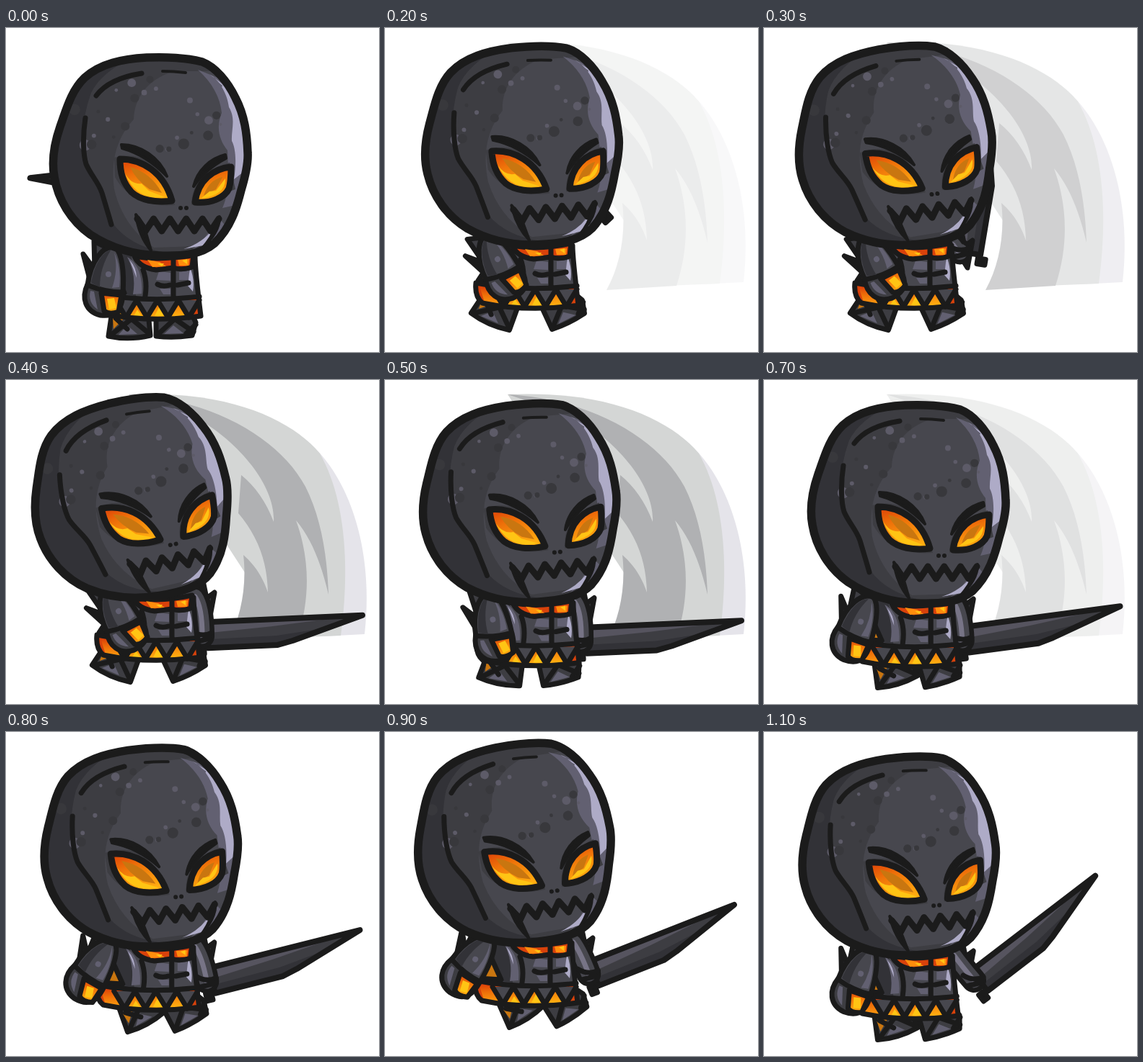
These frames come from a looping animation (517 by 450 pixels, 1200 ms). An HTML page:

```html
<!DOCTYPE html>
<html lang="en">
<head>
<meta charset="utf-8">
<title>Stone warrior slash</title>
<style>
  html, body { margin: 0; width: 100%; height: 100%; overflow: hidden; background: #fff; }
  svg { display: block; width: 517px; height: 450px; }
  .ink { stroke: #1b1b1b; stroke-width: 7; stroke-linejoin: round; stroke-linecap: round; }
  .line { fill: none; }
  .thin { stroke-width: 4; }
  .bold { stroke-width: 9; }
  .dark { fill: #323237; }
  .stone { fill: #3d3d42; }
  .mid { fill: #47474e; }
  .pale { fill: #626071; }
  .shine { fill: #aeabc7; }
  .black { fill: #1b1b1b; }
  .lava { fill: url(#lava); }
  .ember { fill: #d9420b; }
  .amber { fill: #c97610; }
  .gold { fill: #ffc414; }
</style>
</head>
<body>
<svg viewBox="0 0 517 450">
  <defs>
    <linearGradient id="lava" x1="0" y1="0" x2=".25" y2="1">
      <stop offset="0" stop-color="#dc3e08"/>
      <stop offset=".4" stop-color="#ee7009"/>
      <stop offset="1" stop-color="#ffab10"/>
    </linearGradient>
    <path id="skull" d="M272 47C250 41 222 40 195 41C162 43 131 49 109 69C90 87 83 115 75 137C66 163 63 185 67 207C72 238 90 268 117 287C143 304 175 315 212 316C245 317 270 315 289 299C312 277 320 249 326 225C332 205 336 188 335 173C334 147 331 122 318 97C307 74 290 54 272 47Z"/>
    <clipPath id="skullClip"><use href="#skull"/></clipPath>
    <path id="eyeL" d="M158 182C188 182 219 200 230 240C207 243 186 239 174 228C162 215 158 201 158 182Z"/>
    <path id="eyeR" d="M312 193C288 195 266 211 262 242C284 244 303 236 309 223C312 213 312 205 312 193Z"/>
    <clipPath id="eyeClip"><use href="#eyeL"/><use href="#eyeR"/></clipPath>
  </defs>

  <g id="slash">
    <path fill="#e5e4ea" d="M400 72C466 112 512 220 497 353L440 356Z"/>
    <path fill="#d4d6d5" d="M170 20C310 14 395 55 435 102C468 160 478 250 464 355L390 358Z"/>
    <path fill="#b0b1b3" d="M170 20C288 27 380 82 415 148C436 190 445 240 447 298C438 260 425 222 402 195C420 245 423 300 404 358L307 364C326 330 334 285 329 243C345 257 356 274 363 295C362 250 348 216 322 185L326 132C345 147 361 170 371 197C374 152 330 90 260 50Z"/>
  </g>

  <g id="sword">
    <path class="ink black" d="M-17 15H-9V26H-17Z"/>
    <path class="stone" d="M-4 -18H212L114 13L93 18H-4Z"/>
    <path fill="#56545f" d="M0 -16H175L85 -8L0 -3Z"/>
    <path class="dark" d="M0 6L92 5L165 -3L93 18H0Z"/>
    <path class="ink line" style="stroke-width:8" d="M-4 -18H212L114 13L93 18H-4Z"/>
  </g>

  <g id="rightArm">
    <path id="spikes" class="ink stone" d="M268 322L275 294L280 318L291 310L284 348Z"/>
    <path id="armInk" class="line" stroke="#1b1b1b" stroke-width="34" stroke-linecap="round"/>
    <path id="armFill" class="line" stroke="#47474e" stroke-width="21" stroke-linecap="round"/>
    <path id="armLight" class="line" stroke="#777486" stroke-width="7" stroke-linecap="round"/>
    <path id="cuff" class="ink line" d="M-15 -7Q0 2 13 -5M-10 8L10 3"/>
  </g>

  <g id="body">
    <g id="legL">
      <path class="ink stone" d="M147 394H197L200 427Q170 434 142 428Z"/>
      <path class="amber" d="M148 403L164 403L149 418Z"/>
      <path class="pale" d="M168 413L182 425L156 426Z"/>
      <path class="ink line" d="M146 426L174 404L198 424M152 403L168 418"/>
    </g>
    <g id="legR">
      <path class="ink stone" d="M208 394H256L263 409L258 427Q232 431 208 428Z"/>
      <path class="pale" d="M232 413L246 424L219 425Z"/>
      <path class="ink line" d="M210 426L234 404L260 422M250 424L263 412"/>
    </g>
    <path class="mid" d="M150 300H262L270 400Q200 410 137 396Q118 380 150 335Z"/>
    <path class="dark" d="M150 300H172L180 372L146 368Z"/>
    <path class="pale" d="M168 318C183 326 190 347 188 369L176 370Q181 342 168 318ZM212 338L228 340V351L208 350ZM240 339L253 336L257 350H240ZM213 362L228 362V370H218Z"/>
    <path class="shine" d="M255 332Q262 350 259 366L252 358ZM171 322Q181 333 181 347Q176 333 171 322Z"/>
    <path class="ink amber" d="M131 366L150 337L164 368Z"/>
    <path class="ember" d="M128 369Q195 382 268 373L270 400Q200 410 137 397Q126 388 128 369Z"/>
    <path class="lava" d="M133 374L152 378L166 402L140 396ZM182 381L196 403H168ZM212 380L226 403H198ZM242 380L256 402H228Z"/>
    <path class="gold" d="M206 400L212 388L219 400ZM177 400L182 391L188 400Z"/>
    <path id="beltTeeth" class="ink mid"/>
    <path class="ink ember" d="M178 317Q216 324 260 314L258 332Q244 337 232 333L208 336Q185 333 178 317Z"/>
    <path fill="#ff8d0d" d="M196 322L213 325L222 331L203 332ZM238 322L254 321L253 330L240 330Z"/>
    <path class="gold" d="M244 323L251 321V328ZM210 327L219 327L216 331Z"/>
    <path class="ink line" d="M232 318V374M210 356Q218 360 227 357M238 357L253 354M190 336Q196 352 193 372M262 317Q262 335 270 400Q200 410 137 397Q126 388 128 369Q195 382 268 373"/>
    <g id="leftArm">
      <path class="ink stone" d="M118 356L107 314L123 336L122 296L146 308Z"/>
      <path class="ink stone" d="M113 356C104 375 110 394 131 399C148 401 161 396 162 368Z"/>
      <path class="pale" d="M117 365Q113 381 127 391L122 366Z"/>
      <path class="ink lava" d="M132 368L160 371L156 394Q143 399 136 393Z"/>
      <path class="gold" d="M140 376L150 375L153 389L143 391Z"/>
      <path class="ink mid" d="M113 357C117 325 134 301 151 305C161 312 164 340 162 367Q137 367 113 357Z"/>
      <path class="dark" d="M118 354C123 326 135 310 145 309Q130 333 130 360Z"/>
      <path class="pale" d="M150 312Q160 332 157 360L147 361Q156 335 150 312Z"/>
      <circle class="pale" cx="142" cy="342" r="4"/>
    </g>
  </g>

  <g id="head">
    <use href="#skull" class="stone"/>
    <g clip-path="url(#skullClip)">
      <path class="dark" d="M55 30H200Q135 55 118 90Q100 140 110 187Q129 220 147 270Q170 302 220 312L180 330L40 280Z"/>
      <path class="mid" d="M232 60C195 72 178 98 177 127C153 153 145 185 150 224Q162 275 205 305L350 300V60Z"/>
      <path class="pale" d="M266 58C286 76 297 97 299 118C291 137 295 155 307 170C308 200 311 225 300 250L345 240V90ZM235 320Q272 307 294 262L309 281Z"/>
      <path class="shine" d="M282 64C296 72 307 92 309 110C319 126 312 142 313 157C318 166 320 185 316 210L342 190V110ZM246 307Q275 298 291 274L284 300Z"/>
      <path class="pale" d="M285 68L300 80L295 91ZM321 108l10 10l-8 7Z"/>
      <path class="stone" d="M150 180C190 170 220 190 234 246C202 249 168 238 151 207ZM257 246Q257 202 310 187L318 224Z"/>
      <g id="spots"></g>
    </g>
    <use href="#skull" class="ink line" style="stroke-width:11.5"/>
    <path class="ink line" d="M110 125C106 152 107 176 111 189C118 205 128 214 133 229Q140 252 146 273M125 94Q143 70 188 63"/>
    <path class="ink line thin" d="M217 60Q232 60 249 62"/>
    <use href="#eyeL" class="lava"/><use href="#eyeR" class="lava"/>
    <g clip-path="url(#eyeClip)">
      <path class="amber" d="M172 193Q201 201 216 229L199 224Q180 211 172 193ZM300 207Q281 211 274 233L291 224Z"/>
      <path class="gold" d="M165 202Q174 218 188 216L198 226L220 235Q180 240 165 202ZM270 237L282 227L291 226L304 209Q305 232 270 237Z"/>
    </g>
    <use href="#eyeL" class="ink line bold"/>
    <use href="#eyeR" class="ink line bold"/>
    <path class="ink black thin" d="M160 162C186 162 213 180 223 206C206 188 186 174 161 167ZM304 176C283 181 265 198 260 220C271 204 288 190 305 181Z"/>
    <circle class="black" cx="242" cy="250" r="3"/><circle class="black" cx="250" cy="250" r="3"/>
    <path id="teeth" class="ink line bold"/>
    <path class="ink black thin" d="M180 259Q184 289 201 309L191 274ZM296 262Q297 283 270 308Q287 290 290 275Z"/>
  </g>
</svg>
<script>
const el = id => document.getElementById(id);
const LOOP = 1200, STEP = 100;

function zigzag(left, right, high, low, count) {
  const width = (right - left) / count;
  let path = `M${left} ${high}`;
  for (let i = 0; i < count; i++) path += `l${width / 2} ${low - high}l${width / 2} ${high - low}`;
  return path;
}

function seeded(seed) {
  return () => (seed = seed * 16807 % 2147483647) / 2147483647;
}

// Pock marks scattered over the upper skull, dark and light in turn.
function spots(count) {
  const random = seeded(41);
  let marks = "";
  for (let i = 0; i < count; i++) {
    const x = 95 + 210 * (i + random()) / count;
    const y = 70 + 110 * random();
    const r = 2 + 6 * random() ** 1.5;
    marks += `<circle cx="${x}" cy="${y}" r="${r}" fill="${i % 2 ? "#5d5b68" : "#38383c"}"/>`;
  }
  return marks;
}

el("spots").innerHTML = spots(26);
el("teeth").setAttribute("d", zigzag(182, 295, 265, 282, 5));
el("beltTeeth").setAttribute("d", zigzag(152, 268, 378, 402, 4));

// Rises from 0 to 1 between two steps; a power above 1 starts slowly.
const ramp = (s, from, to, power = 1) => Math.min(1, Math.max(0, (s - from) / (to - from))) ** power;
const setTransform = (id, value) => el(id).setAttribute("transform", value);
const turn = (id, angle, x, y) => setTransform(id, `rotate(${angle} ${x} ${y})`);

function draw(time) {
  const s = Math.floor((time % LOOP) / STEP);

  const hop = ramp(s, 0, 2) * (1 - ramp(s, 4, 6));
  const recoil = Math.sin(Math.PI * ramp(s, 6, 12));
  const lunge = ramp(s, 0, 4, 1.4) * (1 - ramp(s, 4, 6));
  const nod = Math.sin(Math.PI * ramp(s, 7, 12));
  const recover = ramp(s, 6, 11, 1.2);

  const bodyX = -2 * hop - 3 * recoil ** 2;
  const bodyY = -15 * hop - 24 * recoil ** 2;
  setTransform("body", `translate(${bodyX} ${bodyY})`);
  turn("leftArm", 27 * recoil - 33 * hop, 140, 312);
  turn("legL", 25 * hop - 32 * recoil, 170, 373);
  turn("legR", -25 * hop - 32 * recoil, 233, 373);

  const headTurn = -11 * lunge - 9 * nod;
  setTransform("head", `translate(${1.3 * headTurn} ${bodyY + 0.6 * headTurn}) rotate(${headTurn} 246 250)`);

  const swordX = 245 + 38 * ramp(s, 1, 2) + 19 * recover;
  const swordY = 231 + 138 * ramp(s, 0, 4, 1.4) - 20 * recover + bodyY;
  const swordTurn = -169 + 166.5 * ramp(s, 0, 4, 2.2) - 35 * recover;
  setTransform("sword", `translate(${swordX} ${swordY}) rotate(${swordTurn})`);

  const handX = swordX - 11, handY = swordY + 2;
  const reach = `M${264 + bodyX} ${316 + bodyY}Q${274 + bodyX} ${330 + bodyY} ${handX} ${handY}`;
  for (const id of ["armInk", "armFill", "armLight"]) el(id).setAttribute("d", reach);
  setTransform("spikes", `translate(${bodyX} ${bodyY})`);
  setTransform("cuff", `translate(${handX} ${handY})`);
  el("rightArm").style.display = s > 2 ? "" : "none";

  el("slash").style.opacity = ramp(s, 1, 4, 1.3) * (1 - ramp(s, 6, 8)) ** 1.4;
}

const began = performance.now();
function tick() {
  draw(performance.now() - began);
  requestAnimationFrame(tick);
}
tick();
</script>
</body>
</html>
```
